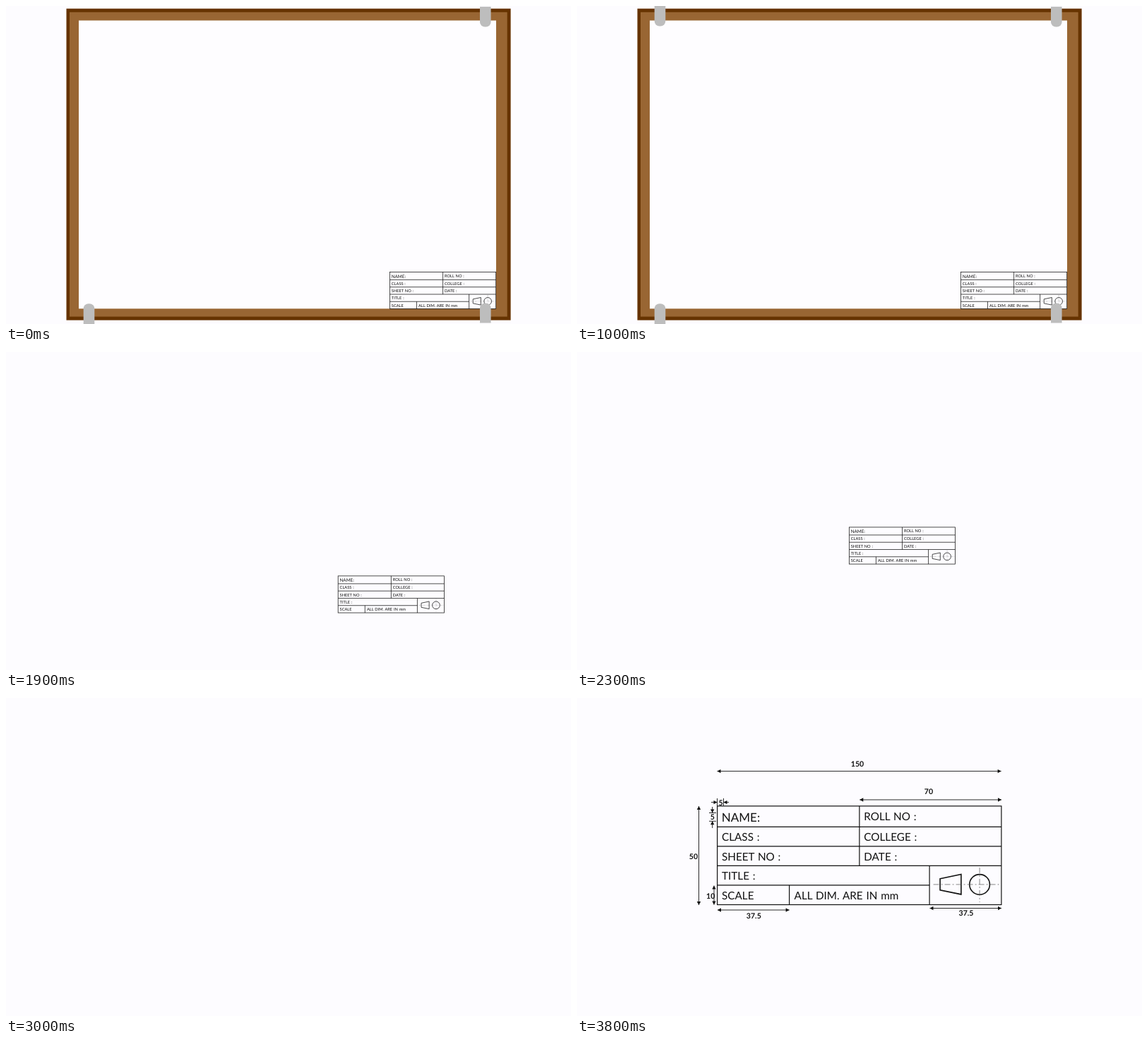
Animation of 800x450 px, one loop 3.9 s. Source, as an HTML page with a canvas:

```html
<!DOCTYPE html>
<html lang="en">
<head>
<meta charset="utf-8">
<title>Drawing sheet title block</title>
<style>
  html, body { margin: 0; width: 100%; height: 100%; overflow: hidden; background: #fdfcff; }
  canvas { display: block; width: 800px; height: 450px; }
</style>
</head>
<body>
<canvas id="stage" width="800" height="450"></canvas>
<script>
const ctx = document.getElementById('stage').getContext('2d');
const LOOP = 3900, STEP = 100;
const PAPER = '#fdfcff', INK = '#111';
const SMALL = 0.3735;
const FONT = 'Lato, Carlito, "Open Sans", sans-serif';

function box(color, x0, y0, x1, y1) {
  ctx.fillStyle = color;
  ctx.fillRect(x0, y0, x1 - x0, y1 - y0);
}

function line(x0, y0, x1, y1) {
  ctx.beginPath();
  ctx.moveTo(x0, y0);
  ctx.lineTo(x1, y1);
  ctx.stroke();
}

function clip(x, y, w, h, radii) {
  ctx.fillStyle = '#bdbdbd';
  ctx.beginPath();
  ctx.roundRect(x, y, w, h, radii);
  ctx.fill();
}

function drawBoard() {
  box('#663300', 85.5, 3.7, 714.6, 444.6);
  box('#996633', 90, 8.7, 709.7, 439.6);
  box('#fefdff', 103, 20.5, 694, 428.3);
}

function drawClips(all) {
  const down = [0, 0, 7, 7], up = [7, 7, 0, 0];
  if (all) clip(109.7, 0, 15.6, 28.5, down);
  clip(671, 1, 15.6, 28.5, down);
  clip(109.7, 421.3, 15.6, 28.7, up);
  clip(671, 420.5, 15.6, 28, up);
}

// Title block with its top left corner at (x, y), in full-size units.
function drawBlock(x, y, scale) {
  ctx.save();
  ctx.translate(x, y);
  ctx.scale(scale, scale);
  const small = scale < 1;
  ctx.strokeStyle = INK;
  ctx.lineWidth = small ? 2 : 1.2;

  ctx.strokeRect(0, 0, 402.3, 139.6);
  line(0, 29.5, 402.3, 29.5);
  line(0, 57, 402.3, 57);
  line(0, 84.5, 402.3, 84.5);
  line(0, 112, 300.5, 112);
  line(201.3, 0, 201.3, 84.5);
  line(102, 112, 102, 139.6);
  line(300.5, 84.5, 300.5, 139.6);

  // Projection symbol
  ctx.lineWidth = small ? 2 : 1.6;
  ctx.beginPath();
  ctx.moveTo(315.5, 102.8);
  ctx.lineTo(345.3, 96.6);
  ctx.lineTo(345.3, 125);
  ctx.lineTo(315.5, 119);
  ctx.closePath();
  ctx.stroke();
  ctx.beginPath();
  ctx.arc(371.5, 111, 14.3, 0, 2 * Math.PI);
  ctx.stroke();
  ctx.lineWidth = 0.7;
  ctx.strokeStyle = '#555';
  ctx.setLineDash([8, 3, 2, 3]);
  line(306, 111, 399, 111);
  line(371.5, 87, 371.5, 136);
  ctx.setLineDash([]);

  ctx.fillStyle = INK;
  ctx.textAlign = 'left';
  const write = (text, tx, ty, size = 15.28) => {
    ctx.font = `${size}px ${FONT}`;
    ctx.fillText(text, tx, ty);
  };
  ctx.wordSpacing = '0.9px';
  write('NAME:', 6.2, 21.7, 17);
  write('CLASS :', 6.4, 49.4);
  write('SHEET NO :', 6.4, 77);
  write('TITLE :', 6.4, 104.5);
  write('SCALE', 6.4, 132);
  write('ROLL NO :', 207.7, 19.8);
  write('COLLEGE :', 207.7, 49.4);
  write('DATE :', 207.7, 77);
  write('ALL DIM. ARE IN mm', 109, 132);
  ctx.restore();
}

// Arrowhead with its tip at (x, y), pointing along (dx, dy).
function head(x, y, dx, dy) {
  const len = 5, half = 2.7;
  const bx = x - dx * len, by = y - dy * len;
  ctx.beginPath();
  ctx.moveTo(x, y);
  ctx.lineTo(bx - dy * half, by + dx * half);
  ctx.lineTo(bx + dy * half, by - dx * half);
  ctx.fill();
}

function label(text, x, y) {
  ctx.font = `bold 10.6px ${FONT}`;
  ctx.fillText(text, x, y);
}

function span(x0, y0, x1, y1) {
  const d = Math.hypot(x1 - x0, y1 - y0);
  const dx = (x1 - x0) / d, dy = (y1 - y0) / d;
  line(x0, y0, x1, y1);
  head(x0, y0, -dx, -dy);
  head(x1, y1, dx, dy);
}

function drawDimensions() {
  ctx.fillStyle = ctx.strokeStyle = INK;
  ctx.lineWidth = 0.9;
  ctx.textAlign = 'center';
  ctx.wordSpacing = '0px';

  span(198.5, 103.6, 600.6, 103.6);
  label('150', 397, 97);
  span(400.3, 144, 601, 144);
  label('70', 498, 136.4);
  span(172.5, 153, 172.5, 293);
  label('50', 165, 227.6);
  span(194, 265.6, 194, 292.6);
  label('10', 189.2, 284);
  span(199, 300, 300.6, 300);
  label('37.5', 250.3, 312);
  span(499.5, 297.5, 601, 297.5);
  label('37.5', 551, 308.3);

  // Text margins, measured from outside
  line(198.5, 142, 198.5, 153);
  line(207.5, 142, 207.5, 152.5);
  line(190, 147.6, 198.5, 147.6);
  line(207.5, 147.6, 215, 147.6);
  head(198.5, 147.6, 1, 0);
  head(207.5, 147.6, -1, 0);
  label('5', 203.6, 151.6);

  line(187, 162.5, 197, 162.5);
  line(187, 174.3, 197, 174.3);
  line(191.7, 154, 191.7, 162.5);
  line(191.7, 174.3, 191.7, 184);
  head(191.7, 162.5, 0, 1);
  head(191.7, 174.3, 0, -1);
  label('5', 191.8, 172.3);
}

// Steady acceleration, constant speed, steady braking.
function glide(u) {
  const a = 0.4, v = 1 / (1 - a);
  u = Math.min(1, Math.max(0, u));
  if (u < a) return v * u * u / (2 * a);
  if (u > 1 - a) return 1 - v * (1 - u) * (1 - u) / (2 * a);
  return v * (u - a / 2);
}

function draw(t) {
  box(PAPER, 0, 0, 800, 450);
  const onBoard = t < 1100;
  if (onBoard) drawBoard();
  if (t < 3000) {
    const p = glide((t - 1215) / 1710);
    drawBlock(543.4 - 219 * p, 376.4 - 178 * p, SMALL);
  }
  if (onBoard) drawClips(t >= 1000);
  if (t >= 3200) {
    ctx.globalAlpha = Math.min(1, (t - 3100) / 500);
    drawBlock(198.6, 152.9, 1);
    ctx.globalAlpha = 1;
  }
  if (t >= 3800) drawDimensions();
}

ctx.textRendering = 'geometricPrecision';
const start = performance.now();
function tick() {
  const t = (performance.now() - start) % LOOP;
  draw(Math.floor(t / STEP) * STEP);
  requestAnimationFrame(tick);
}
tick();
</script>
</body>
</html>
```
